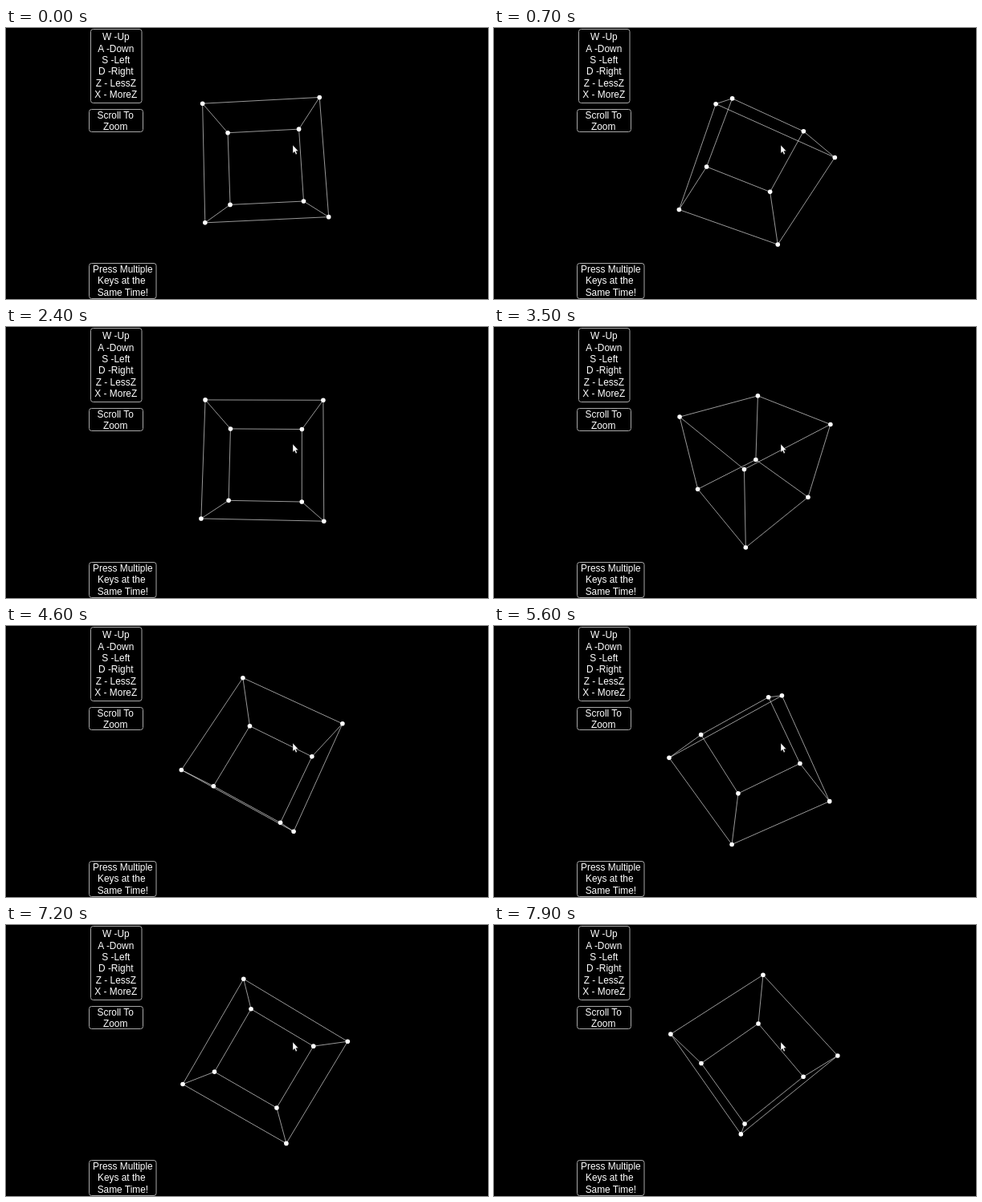
An HTML page that plays this animation: 600 px wide and 338 px high, repeating every 8000 ms.

```html
<!DOCTYPE html>
<html lang="en">
<head>
<meta charset="utf-8">
<title>Rotating cube</title>
<style>
  html, body { margin: 0; width: 100%; height: 100%; overflow: hidden; background: #000; }
  svg { display: block; width: 100%; height: 100%; }
  text { font: 11.9px "Liberation Sans", Arial, sans-serif; fill: #fff; text-anchor: middle; }
  .panel { fill: none; stroke: #a8a8a8; stroke-width: 1; }
  .edge { fill: none; stroke: #fff; stroke-width: 0.6; }
  .dot { fill: #fff; }
</style>
</head>
<body>
<svg id="stage" viewBox="0 0 600 338">
  <rect width="600" height="338" fill="#000"/>
</svg>
<script>
const STEP_MS = 100, STEPS = 80;
const CENTER = [321.8, 168.9], SCALE = 225, CAMERA = 2;
const RATE = 3.8, START = { tilt: 4.7, spin: -2.8 }; // degrees
const YAW = -0.8 * Math.PI / 180;

// Held keys: [last step, tilt direction, spin direction]
const KEYS = [
  [42.7, -1, 1], [44.1, 0, 0], [49, -1, -1], [50, 0, 0], [61.5, -1, -1],
  [62.1, 0, 0], [77.2, 1, -1], [78.4, 0, 0], [80, -1, -1]
];

const stage = document.getElementById('stage');

function add(tag, attrs, text) {
  const node = document.createElementNS('http://www.w3.org/2000/svg', tag);
  for (const key in attrs) node.setAttribute(key, attrs[key]);
  if (text) node.textContent = text;
  return stage.appendChild(node);
}

function panel(x, y, width, height, textX, baseline, lines) {
  add('rect', { class: 'panel', x, y, width, height, rx: 3 });
  lines.forEach((line, i) => {
    add('text', { x: textX, y: baseline + i * 14.35 }, line);
  });
}

panel(105.5, 1.5, 63.5, 92, 136.8, 15.4,
  ['W -Up', 'A -Down', 'S -Left', 'D -Right', 'Z - LessZ', 'X - MoreZ']);
panel(103.5, 101.5, 67, 28, 136.2, 113, ['Scroll To', 'Zoom']);
panel(103.5, 293.5, 83.5, 44, 145.4, 305, ['Press Multiple', 'Keys at the\u00a0', 'Same Time!']);

const wire = add('path', { class: 'edge' });
const dots = Array.from({ length: 8 }, () => add('circle', { class: 'dot', r: 2.8 }));
add('path', {
  d: 'M357 146V156.3L359.2 154.2L360.8 157.7L362.4 156.9L360.9 153.5H363.9Z',
  fill: '#fff', stroke: '#000', 'stroke-width': 0.4
});

function pose(step) {
  let { tilt, spin } = START, from = 0;
  for (const [end, tiltDir, spinDir] of KEYS) {
    const span = Math.max(0, Math.min(step, end) - from) * RATE;
    tilt += tiltDir * span;
    spin += spinDir * span;
    from = end;
  }
  return [tilt, spin].map(a => a * Math.PI / 180);
}

function rotate(a, b, angle) {
  const c = Math.cos(angle), s = Math.sin(angle);
  return [a * c - b * s, a * s + b * c];
}

function project(index, tilt, spin) {
  let [x, y, z] = [1, 2, 4].map(bit => index & bit ? 0.5 : -0.5);
  [x, y] = rotate(x, y, spin);
  [z, x] = rotate(z, x, YAW);
  [y, z] = rotate(y, z, tilt);
  const k = SCALE / (CAMERA - z);
  return [CENTER[0] + x * k, CENTER[1] + y * k];
}

function draw(ms) {
  const [tilt, spin] = pose(Math.floor(ms / STEP_MS) % STEPS);
  const points = dots.map((_, i) => project(i, tilt, spin));
  let d = '';
  points.forEach(([x, y], i) => {
    dots[i].setAttribute('cx', x);
    dots[i].setAttribute('cy', y);
    for (const bit of [1, 2, 4]) {
      if (!(i & bit)) d += `M${x} ${y}L${points[i | bit].join(' ')}`;
    }
  });
  wire.setAttribute('d', d);
}

const begin = performance.now();
function tick() {
  draw(performance.now() - begin);
  requestAnimationFrame(tick);
}
tick();
</script>
</body>
</html>
```
